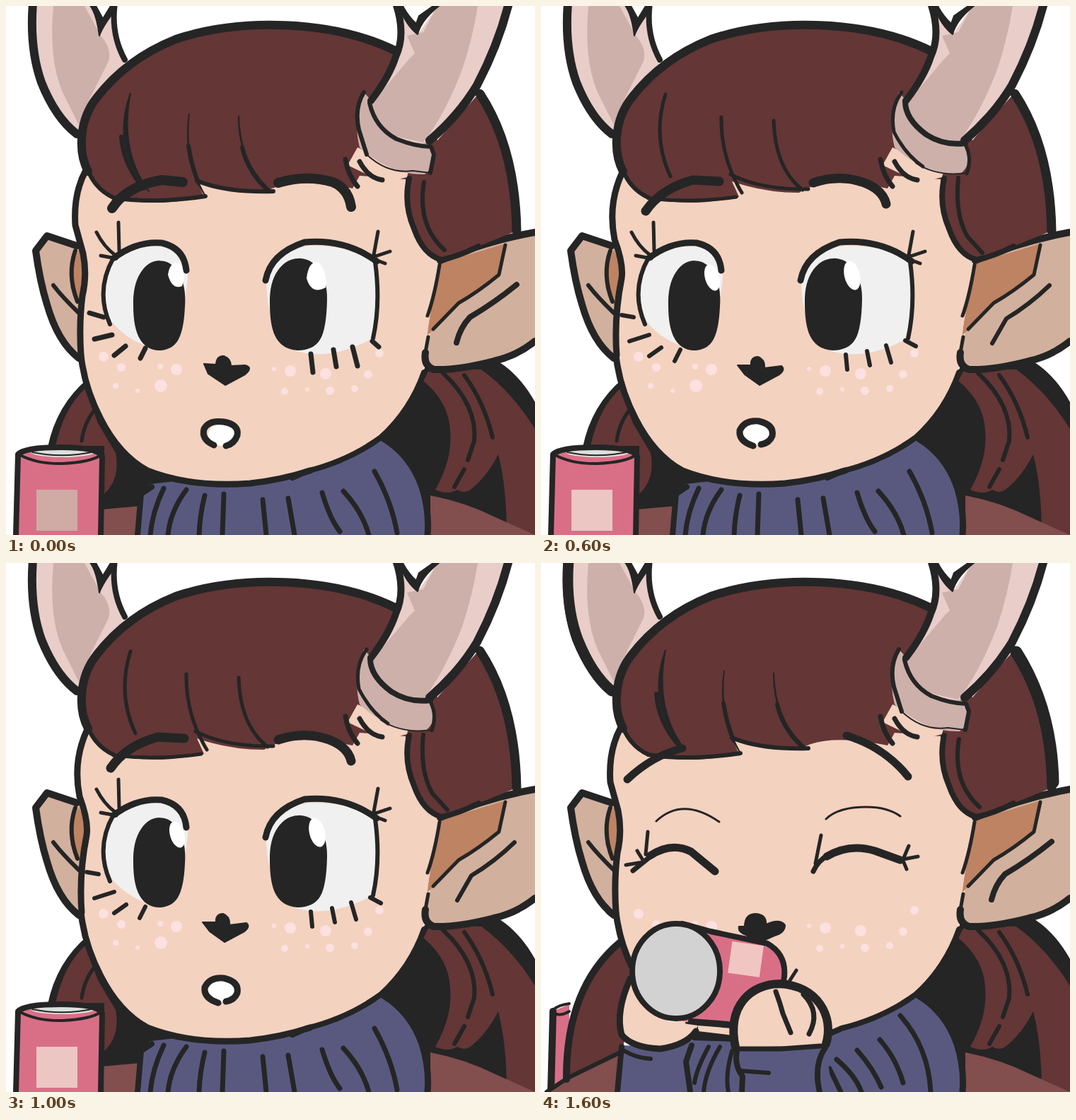
An HTML page that plays this animation: 748x748 px, repeating every 1.8 s.

```html
<!DOCTYPE html>
<html lang="en">
<head>
<meta charset="utf-8">
<title>Soda sip</title>
<style>
html, body { margin: 0; width: 100%; height: 100%; overflow: hidden; background: #fff; }
svg { display: block; width: 100vw; height: 100vh; }
.line { fill: none; stroke: #252525; stroke-linecap: round; stroke-linejoin: round; }
.ink { fill: #252525; stroke: #252525; stroke-width: 2; stroke-linejoin: round; }
.hair { fill: #643636; }
.skin { fill: #f4d2c0; }
.wool { fill: #595980; }
.coat { fill: #824e4e; }
.can { fill: #d96f87; }
.horn { fill: #e9cdc8; }
.shade { fill: #ceb0aa; }
.ear { fill: #d2b09e; }
.inner { fill: #be8362; }
.white { fill: #f0f0f0; }
.shine { fill: #fff; }
svg:not(.rough) .rough, svg:not(.neat) .neat,
svg:not(.look) .look, svg:not(.sip) .sip, svg:not(.bold) .bold { display: none; }
</style>
</head>
<body>
<svg id="stage" class="rough look" viewBox="0 0 748 748">
  <!-- ponytail and right shoulder -->
  <path class="ink" d="M598 505L690 500Q725 520 748 562V748H590L525 615Z"/>
  <path class="hair" d="M597 517Q640 513 672 514Q715 545 748 598V748H708Q708 680 696 634Q680 665 660 681Q650 691 638 684Q625 692 607 684Q632 640 628 600Q626 560 590 530Z"/>
  <path class="line" stroke-width="6" d="M648 522Q676 560 688 610M618 519Q667 565 662 615L653 642M648 655L634 680"/>
  <path class="coat" d="M600 692Q650 702 690 722L748 748H600Z"/>

  <!-- hair behind the left cheek -->
  <g class="look">
    <path class="ink" d="M60 624Q72 565 116 528L180 620L240 670L188 712H130Z"/>
    <path class="hair" d="M70 622Q82 568 112 541L130 590L155 632Q162 668 139 690V622Z"/>
    <path class="line" stroke-width="5" d="M126 570Q110 590 107 615"/>
    <path class="coat" d="M134 712L190 707V748H134Z"/>
  </g>
  <g class="sip">
    <path class="can" d="M16 634L40 624V748H14Z"/>
    <path class="line" stroke-width="10" d="M14 748L17 634"/>
    <path class="line" stroke-width="4" d="M17 632Q24 625 40 623M22 638Q30 640 40 634"/>
    <path class="coat" d="M6 748L38 728L125 688V748Z"/>
    <path class="hair" d="M112 536Q35 600 36 732L114 690L140 600Z"/>
    <path class="line" stroke-width="10" d="M112 536Q35 600 36 730"/>
    <path class="line" stroke-width="6" d="M8 748L38 728L112 692"/>
  </g>

  <!-- turtleneck -->
  <path class="wool" d="M204 676L190 690L184 748H596Q600 690 578 655Q555 620 530 606L340 660Z"/>
  <path class="line" stroke-width="9" d="M534 612Q572 635 588 680Q599 715 596 748"/>
  <g class="look">
    <path class="line" stroke-width="8" d="M206 680L191 690L186 748"/>
    <path class="line" stroke-width="7" d="M223 682Q207 715 204 748M255 684Q232 715 229 748M281 692Q274 720 273 748M308 690L306 748M363 698L368 748M399 696L408 748M447 688Q458 725 472 743M477 686Q504 715 513 748M521 658Q545 700 553 745"/>
  </g>
  <path class="sip line" stroke-width="7" d="M408 715L424 748M418 702Q445 725 453 748M447 689Q470 715 481 741M479 674Q502 700 512 735M508 640Q548 685 551 748"/>

  <!-- ears -->
  <path class="ear" d="M104 338L60 324L42 345L58 420L75 470L104 500L112 430Z"/>
  <path class="inner" d="M103 345Q90 370 91 398L106 428L115 370Z"/>
  <path class="line" stroke-width="10" d="M100 339L58 325L42 346Q48 390 58 422Q73 475 103 498"/>
  <path class="line" stroke-width="6" d="M67 395Q80 412 103 434M98 346Q86 380 101 418"/>
  <path class="ear" d="M612 362Q680 330 748 321V474Q720 496 690 502L600 515L592 498L602 450Z"/>
  <path class="inner" d="M613 364L706 336L697 382L640 420L594 468Z"/>

  <!-- face -->
  <path class="skin" d="M114 225Q92 280 104 340Q118 375 108 410Q102 450 105 490Q112 540 132 583Q155 630 195 653Q260 680 350 672Q460 655 530 610Q570 570 590 518L597 455Q604 400 611 362L580 310L560 220Z"/>
  <path class="line" stroke-width="8" d="M591 518Q572 572 530 610Q485 643 425 658L405 667"/>
  <path class="look line" stroke-width="9" d="M106 494Q111 540 134 584Q160 635 200 657Q260 681 345 675Q390 670 430 657"/>
  <path class="sip line" stroke-width="9" d="M106 494Q111 535 128 570"/>
  <path class="rough line" stroke-width="9" d="M113 232Q95 265 98 310L109 350Q115 380 108 410Q103 450 106 494"/>
  <path class="neat line" stroke-width="9" d="M115 235Q94 280 104 330Q117 365 114 385Q103 440 107 494"/>
  <g id="freckles" fill="#fde0e0"></g>

  <!-- right ear lines -->
  <path class="line" stroke-width="10" d="M614 360Q680 332 748 320M748 474Q722 495 690 502Q640 515 605 514Q590 509 593 490"/>
  <path class="line" stroke-width="5" d="M593 490L597 468M706 338L697 380Q668 404 640 420L604 457M613 366Q606 410 596 438"/>
  <path class="rough line" stroke-width="8" d="M722 394Q690 420 656 440Q642 455 637 476"/>
  <path class="neat line" stroke-width="6" d="M719 395Q690 423 658 442L638 477"/>

  <!-- left horn -->
  <path class="horn" d="M38 0Q30 90 64 140Q85 172 102 184L120 140L170 78L154 45L155 0L134 36L122 0Z"/>
  <path class="shade" d="M67 0Q60 75 80 122L104 170L118 132L145 78Q150 60 134 42L111 0Z"/>
  <path class="line" stroke-width="12" d="M38 -4Q33 60 50 108Q70 158 100 181"/>
  <path class="bold line" stroke-width="15" d="M39 -4Q34 60 52 108Q72 158 100 181"/>
  <path class="line" stroke-width="8" d="M154 -4Q148 40 168 76"/>
  <path class="ink" d="M118 -2Q128 10 132 42Q137 28 155 5L148 0L137 18L126 -2Z"/>

  <!-- hair -->
  <path class="hair" d="M110 222C98 190 112 150 128 130Q170 75 240 47C330 15 460 18 555 64L610 190L670 122Q712 180 722 318L618 360Q566 330 565 245L500 240L490 258Q400 240 365 264Q315 264 270 248L280 270Q205 286 150 270Q128 255 118 236Z"/>
  <path class="line" stroke-width="12" d="M116 234C101 205 104 160 128 130Q170 75 240 47C330 17 460 19 550 63"/>
  <path class="line" stroke-width="13" d="M670 124Q720 200 722 318"/>
  <path class="bold line" stroke-width="17" d="M672 126Q722 205 724 310"/>
  <path class="line" stroke-width="8" d="M570 244Q562 280 577 315Q590 352 616 359Q640 354 668 340"/>
  <path class="rough line" stroke-width="6" d="M591 249Q581 310 620 345"/>
  <path class="neat line" stroke-width="6" d="M590 243Q585 295 603 326L624 349"/>
  <path class="line" stroke-width="6" d="M117 235Q128 260 152 271"/>
  <g class="rough">
    <path class="ink" d="M176 123Q148 200 202 262Q160 205 176 123M259 152Q251 215 282 269L268 245Q252 205 259 152M329 155Q330 225 378 264Q328 225 329 155"/>
    <path class="line" stroke-width="6" d="M163 185Q166 225 195 258M258 198Q262 225 272 250M334 200Q342 235 370 260M152 271Q205 280 282 269M270 247Q310 264 378 262"/>
  </g>
  <g class="neat">
    <path class="line" stroke-width="5" d="M176 125Q157 185 183 241M255 157Q254 215 284 264M329 162Q331 230 370 260M152 272Q215 279 276 270M268 238Q310 260 378 259"/>
  </g>

  <!-- right horn -->
  <path class="skin" d="M497 200L483 225L535 250L567 242L570 230Z"/>
  <path class="line" stroke-width="7" d="M480 217Q484 240 497 255M500 220Q512 243 532 246"/>
  <path class="shade" d="M506 122Q490 160 500 200Q545 240 592 238Q610 225 603 200L540 160Z"/>
  <path class="horn" d="M555 0L562 40L550 72L515 132Q515 160 545 182Q570 196 597 193Q650 140 675 105Q705 50 710 0H610L584 38Z"/>
  <path class="shade" d="M567 42L578 67L570 75L515 140Q520 170 550 184L590 193Q620 155 645 90Q660 45 667 0H610L590 37Z"/>
  <path class="line" stroke-width="10" d="M551 -4Q566 40 551 72Q542 100 516 134"/>
  <path class="line" stroke-width="12" d="M711 -4Q696 55 666 112Q640 155 599 190"/>
  <path class="ink" d="M554 -2Q566 28 582 40Q587 20 612 0H604L584 14L580 25Q568 14 560 -2Z"/>
  <g class="rough">
    <path class="line" stroke-width="6" d="M514 137Q522 172 552 188Q580 199 601 199L605 210L600 236"/>
    <path class="line" stroke-width="6" d="M506 122Q492 145 499 175L510 210"/>
    <path class="line" stroke-width="2" d="M510 210Q540 238 575 233L600 236"/>
  </g>
  <g class="neat">
    <path class="line" stroke-width="8" d="M515 135Q515 160 545 182Q570 198 600 194"/>
    <path class="line" stroke-width="5" d="M510 122Q493 145 499 178Q515 210 540 227M600 196Q610 215 602 237"/>
    <path class="line" stroke-width="2" d="M530 222Q560 242 602 236"/>
  </g>

  <!-- open eyes, nose, mouth -->
  <g class="look">
    <path class="white" d="M150 360Q185 332 225 340Q258 352 257 385L250 440Q235 485 205 483Q165 470 145 440Q132 400 150 360Z"/>
    <path class="white" d="M368 385Q382 345 430 339Q500 339 522 365Q530 420 518 470Q460 502 410 488Q368 460 368 385Z"/>
    <path class="ink" d="M181 424C178 340 258 340 252 425C250 470 240 486 215 486C188 484 181 455 181 424Z"/>
    <path class="ink" d="M374 420C372 338 454 338 453 415C452 468 443 486 412 486C380 484 374 455 374 420Z"/>
    <path class="line" stroke-width="9" d="M153 356Q185 332 220 335Q252 342 255 374M367 388Q374 350 422 334Q480 329 524 361"/>
    <path class="line" stroke-width="6" d="M152 356Q126 402 147 450M522 362Q530 420 519 470"/>
    <path class="line" stroke-width="5" d="M159 306L160 346M128 320Q138 340 154 352M134 353L156 357M526 319L520 352M543 347L522 354M536 364L520 358"/>
    <g class="rough">
      <path class="shine" d="M229 380Q232 360 245 364Q256 378 249 396Q235 402 229 380ZM425 385Q428 360 442 362Q455 378 452 398Q432 409 425 385Z"/>
      <path class="line" stroke-width="14" d="M150 286Q170 255 220 246L250 249M385 250Q425 238 462 249Q484 258 488 284"/>
      <path class="line" stroke-width="7" d="M118 434L138 440M125 471L150 465M153 494L169 481M197 484L190 498M431 492L434 518M463 486L467 510M490 482L497 509M518 474L527 482"/>
      <path class="ink" d="M280 506L297 507Q298 494 308 495Q318 499 318 509L338 508Q350 511 338 521L310 536L286 520Z"/>
      <ellipse class="shine" cx="307" cy="606" rx="21" ry="16"/>
      <path class="line" stroke-width="9" d="M294 621Q276 613 280 598Q287 585 308 588Q330 592 327 607Q323 619 311 622"/>
    </g>
    <g class="neat">
      <ellipse class="shine" cx="242" cy="384" rx="10" ry="19" transform="rotate(-17 242 384)"/>
      <ellipse class="shine" cx="440" cy="381" rx="11" ry="21" transform="rotate(-14 440 381)"/>
      <path class="line" stroke-width="13" d="M148 290Q170 258 215 246L252 248M385 250Q425 236 462 252Q484 262 488 280"/>
      <path class="line" stroke-width="6" d="M114 437L131 440M125 474L153 465M153 495L170 483M197 486L189 502M431 493L433 514M461 488L465 508M488 480L495 504M515 473L530 481"/>
      <path class="ink" d="M278 508L297 508Q296 496 307 496Q317 500 316 512L340 509Q346 514 337 521L309 536L288 521Z"/>
      <ellipse class="shine" cx="306" cy="605" rx="20" ry="16"/>
      <path class="line" stroke-width="9" d="M300 622Q279 615 281 600Q288 585 308 587Q330 592 327 608Q323 618 311 620"/>
    </g>
  </g>

  <!-- closed eyes -->
  <g class="sip">
    <path class="line" stroke-width="11" d="M122 306Q158 272 200 262M432 244Q485 260 519 302"/>
    <path class="line" stroke-width="3" d="M163 365Q200 330 252 366M403 362Q420 345 460 345Q490 345 508 358"/>
    <path class="line" stroke-width="11" d="M154 414Q184 394 212 408L246 436M404 415Q436 396 472 407L508 420"/>
    <path class="line" stroke-width="7" d="M130 435L156 414M385 436Q392 420 408 412"/>
    <path class="line" stroke-width="5" d="M120 427L144 423M136 407L144 420M151 380L148 412M396 385L388 425M520 400L512 419L533 415M512 421L517 433"/>
    <path class="ink" d="M288 514Q288 496 304 496Q319 497 318 511Q338 502 345 512Q345 523 330 527L310 536L290 526Q278 522 280 514Z"/>
  </g>

  <!-- soda standing on the table -->
  <g class="look">
    <path class="can" d="M16 632L13 748H134L136 632Q75 610 16 632Z"/>
    <ellipse fill="#dde0dc" cx="80" cy="631" rx="45" ry="7"/>
    <path class="line" stroke-width="8" d="M14 748L17 634Q26 624 78 624Q130 624 136 637L134 748"/>
    <path class="line" stroke-width="4" d="M20 635Q45 648 80 647Q120 645 134 635"/>
    <path class="line" stroke-width="2" d="M37 631Q80 640 126 630"/>
    <rect class="rough" x="43" y="684" width="58" height="58" fill="#d0aaa5"/>
    <rect class="neat" x="43" y="684" width="58" height="58" fill="#ecc6c3"/>
  </g>

  <!-- hands raising the soda -->
  <g class="sip">
    <path class="wool" d="M113 682L180 684L290 670L400 668L412 748H110Z"/>
    <path class="ink" d="M205 650H275V676L215 674Z"/>
    <path class="skin" d="M222 654L270 658L272 668L222 662Z"/>
    <path class="skin" d="M128 583Q98 650 118 675Q160 693 212 674L222 654L180 648Z"/>
    <path class="line" stroke-width="9" d="M126 588Q105 635 114 667Q128 685 168 687Q205 682 219 662"/>
    <path class="can" d="M195 510L232 520L320 539Q350 560 342 605L262 652L200 648Z"/>
    <path class="line" stroke-width="8" d="M200 510L240 521L320 538Q350 555 343 592M212 648L264 652"/>
    <rect x="267" y="538" width="45" height="45" fill="#f0c5c2" transform="rotate(8 290 561)"/>
    <ellipse class="line" style="fill:#d2d2d2" stroke-width="8" cx="191" cy="577" rx="62" ry="67"/>
    <path class="line" stroke-width="5" d="M352 590L361 576"/>
    <path class="skin" d="M274 685C260 620 295 598 335 598C390 598 414 640 402 682Z"/>
    <path class="line" stroke-width="12" d="M275 685C262 625 298 595 338 595C390 598 415 640 403 680"/>
    <path class="line" stroke-width="7" d="M278 687L340 687L395 683M332 606Q338 622 342 637L353 664M371 610Q396 635 379 666"/>
    <path class="line" stroke-width="8" d="M114 684L108 748M213 682L205 705L211 748M277 690Q273 710 285 726L284 748M402 685Q385 710 394 748"/>
    <path class="line" stroke-width="6" d="M237 684Q220 715 217 735M253 684Q232 720 230 748M270 690Q260 725 265 748M118 690Q135 700 155 701M282 718L322 721"/>
  </g>
</svg>
<script>
const stage = document.getElementById('stage');
const freckles = [
  [138, 496, 7], [155, 537, 4], [163, 511, 6], [186, 544, 3], [218, 510, 4], [241, 514, 8], [219, 537, 9],
  [379, 513, 3], [402, 516, 8], [394, 545, 5], [426, 542, 3], [452, 520, 8], [458, 544, 6],
  [493, 541, 5], [512, 521, 6], [528, 491, 6]
];
document.getElementById('freckles').innerHTML =
  freckles.map(([x, y, r]) => `<circle cx="${x}" cy="${y}" r="${r}"/>`).join('');

// Two drawings of every line alternate; the last third of the loop is the sip.
const STEP = 200, STEPS = 9;
function frame() {
  const step = Math.floor(performance.now() / STEP) % STEPS;
  const pose = [step % 2 ? 'neat' : 'rough', step < 6 ? 'look' : 'sip'];
  if (step === 8) pose.push('bold');
  stage.setAttribute('class', pose.join(' '));
  requestAnimationFrame(frame);
}
frame();
</script>
</body>
</html>
```
